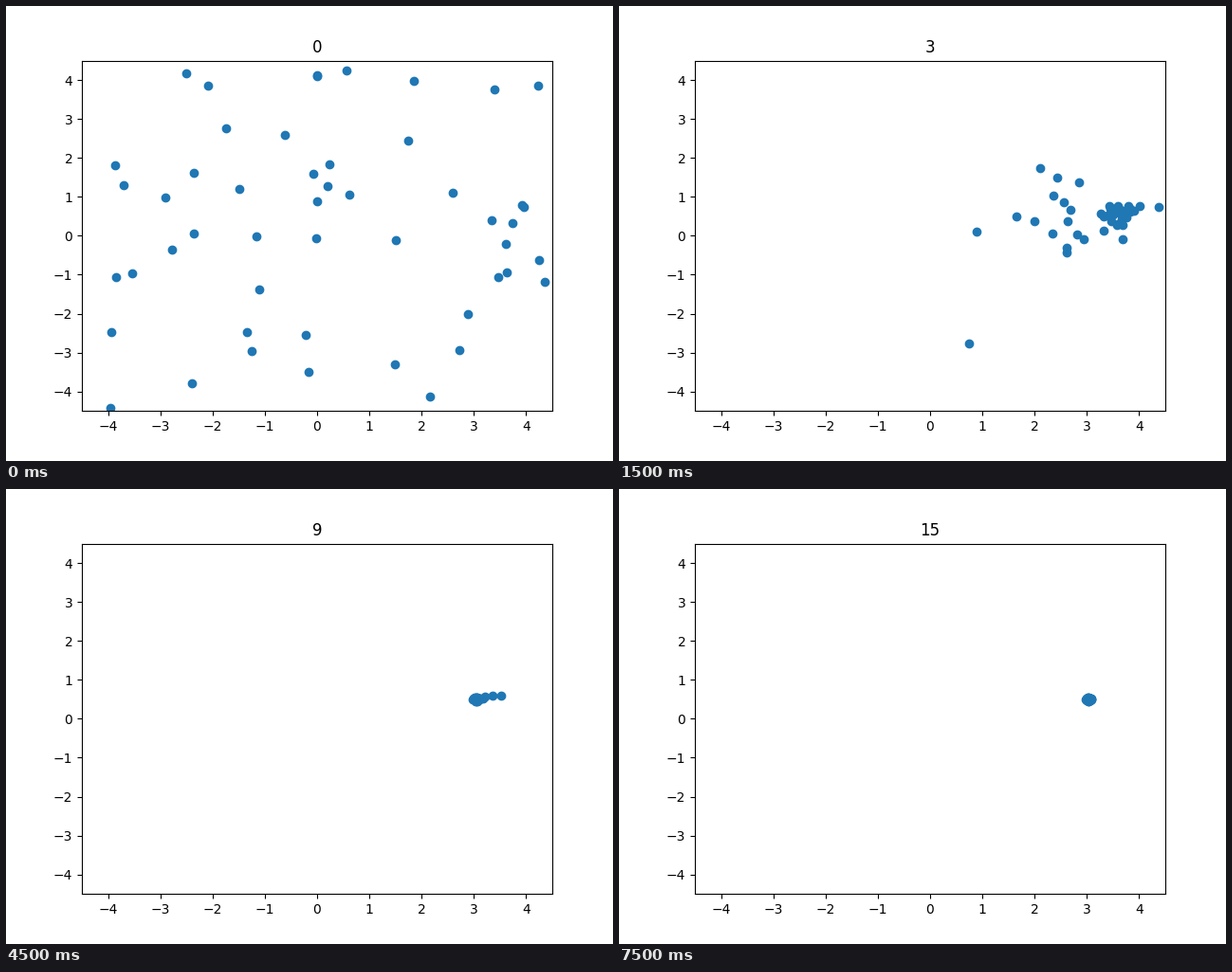
A matplotlib script that plays this animation: 640x480 px, repeating every 8000 ms.

```python
import numpy as np
import matplotlib.pyplot as plt
from matplotlib.animation import FuncAnimation

SIZE = 50
STEPS = 16
LIMIT = 4.5
GOAL = np.array([3.03, 0.5])
DETOUR = np.array([0.62, 0.08])   # the swarm first gathers beside the goal
VALLEY = np.array([1, 0.19])      # direction of the late tail

rng = np.random.default_rng(4)
start = rng.uniform(-LIMIT, LIMIT, (SIZE, 2))
keep = rng.uniform(0.1, 0.8, (SIZE, 1))    # distance kept per step
jitter = rng.normal(size=(SIZE, 2)).clip(-2, 2)
tail = np.linspace(0, 1, SIZE)[:, None] ** 18

# Three late arrivals: below, left of and above the swarm.
KEY_STEPS = [0, 1, 3, 5, 7, 9]
WANDERERS = [
    ([-3.96, 3.78, 0.75, 2.72, 2.37, 3.03], [-4.42, -3.57, -2.76, -1.55, -0.1, 0.5]),
    ([-2.36, -0.54, 1.66, 1.68, 1.2, 3.03], [1.62, 0.54, 0.5, 0.57, 0.9, 0.5]),
    ([0.57, 0.38, 2.1, 3.04, 3.28, 3.03], [4.25, 2.42, 1.74, 1.96, 0.55, 0.5]),
]


def swarm(step):
    if step == 0:
        return start
    fade = np.exp(-0.62 * max(step - 3, 0))
    center = GOAL + DETOUR * fade
    noise = jitter * (np.array([0.027, 0.02]) + np.array([0.1, 0.07]) * fade)
    reach = min(0.07 * (15.5 - step), 0.6)
    points = (center + (start - center) * keep ** step ** 1.3
              + noise + reach * tail * VALLEY)
    return points.clip(-LIMIT, LIMIT)


def population(step):
    points = swarm(step).copy()
    for i, path in enumerate(WANDERERS):
        points[i] = [np.interp(step, KEY_STEPS, axis) for axis in path]
    if step > KEY_STEPS[-1]:
        points[:len(WANDERERS)] += 0.02 * jitter[:len(WANDERERS)]
    return points


fig, ax = plt.subplots(figsize=(6.4, 4.8), dpi=100)
ax.set_xlim(-LIMIT, LIMIT)
ax.set_ylim(-LIMIT, LIMIT)
ax.set_xticks(range(-4, 5))
ax.set_yticks(range(-4, 5))
dots = ax.scatter(*population(0).T, color="#1f77b4")
title = ax.set_title("0")


def update(step):
    dots.set_offsets(population(step))
    title.set_text(str(step))
    return dots, title


anim = FuncAnimation(fig, update, frames=STEPS, interval=500,
                     repeat=True, repeat_delay=0)
plt.show()
```
